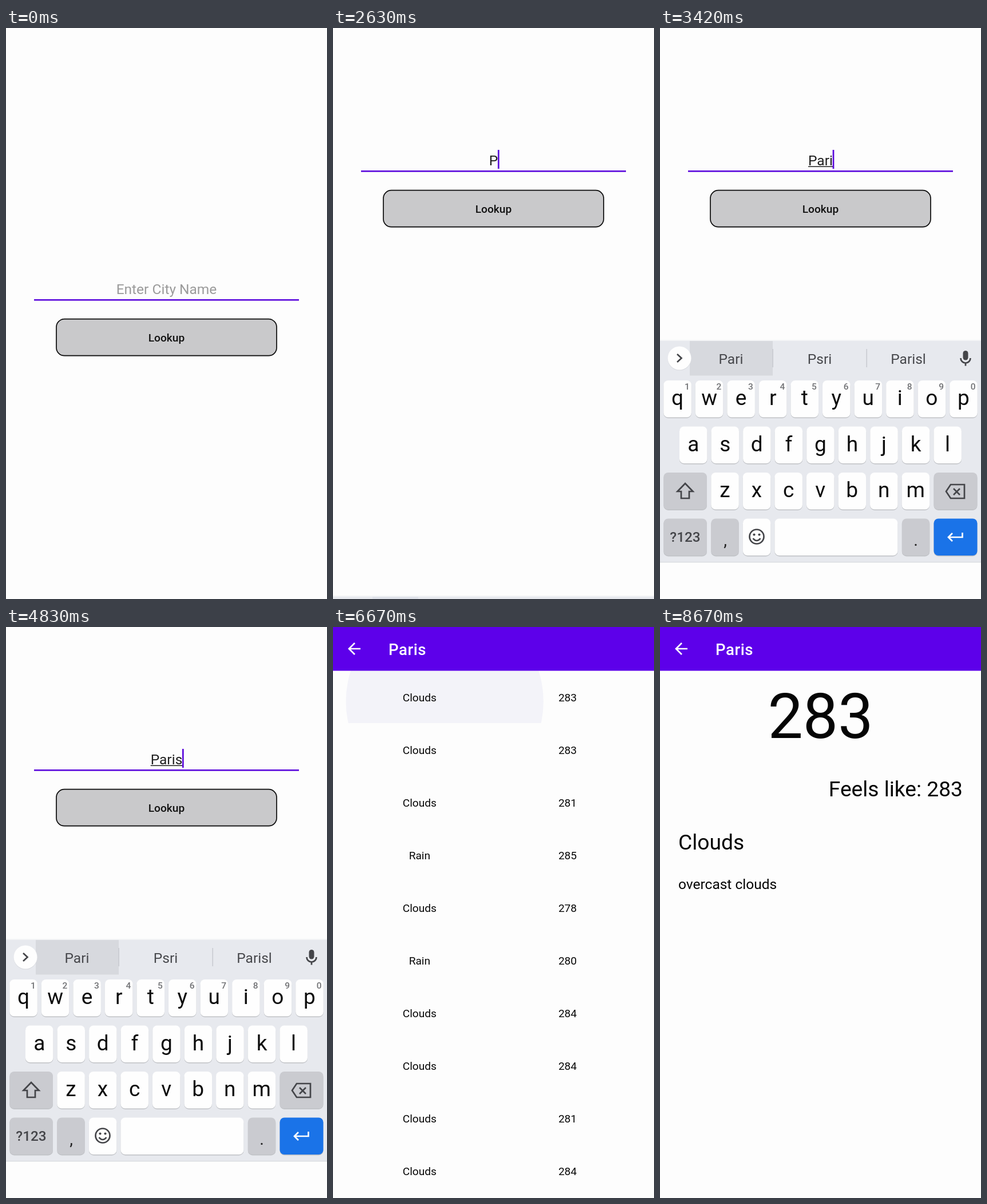
These frames come from a looping animation (561 by 998 pixels, 8.71 s). An HTML page:

```html
<!DOCTYPE html>
<html lang="en">
<head>
<meta charset="utf-8">
<title>City weather lookup</title>
<style>
  html, body { margin: 0; width: 100%; height: 100%; overflow: hidden; background: #fdfdfd; }
  svg { display: block; width: 100%; height: 100%; font-family: Roboto, "Noto Sans", sans-serif; }
  .mid { text-anchor: middle; }
  .icon { fill: none; stroke: #444549; stroke-width: 2.7; }
</style>
</head>
<body>
<svg id="stage" viewBox="0 0 561 998">
  <rect width="561" height="998" fill="#fdfdfd"/>

  <g id="form">
    <text id="hint" class="mid" x="280.5" y="465" font-size="24.5" fill="#9b9b9b">Enter City Name</text>
    <text id="typed" class="mid" x="280.5" y="465" font-size="24.5" fill="#202020"></text>
    <rect id="composing" y="466.5" height="1.5" fill="#202020"/>
    <rect id="caret" y="438" width="2.7" height="33" fill="#5a08dc"/>
    <rect x="49" y="474" width="463" height="2.6" fill="#5a08dc"/>
    <rect x="89" y="511" width="384" height="64" rx="15" fill="#eeeeef"/>
    <rect x="88" y="508.7" width="385" height="64" rx="14" fill="#c9c9cb" stroke="#0a0a0a" stroke-width="1.7"/>
    <text class="mid" x="280.5" y="548" font-size="19.1" font-weight="500" fill="#111">Lookup</text>
  </g>

  <g id="list"></g>

  <g id="detail" fill="#050505">
    <text class="mid" x="280.5" y="194" font-size="109.2">283</text>
    <text x="529" y="296" font-size="37.2" text-anchor="end">Feels like: 283</text>
    <text x="32" y="389" font-size="37.2">Clouds</text>
    <text x="32" y="457.5" font-size="24.5">overcast clouds</text>
  </g>

  <g id="spinner">
    <circle r="27" fill="#fdfdfd" stroke="#e2e1ee" stroke-width="1.6" vector-effect="non-scaling-stroke"/>
    <path id="arc" fill="none" stroke="#222" stroke-width="3.4"/>
  </g>

  <g id="header">
    <rect width="561" height="76.5" fill="#5d00ea"/>
    <path d="M48 38H28M38 28L28 38L38 48" fill="none" stroke="#fff" stroke-width="2.7"/>
    <text x="97" y="49" font-size="27.5" font-weight="500" letter-spacing=".55" fill="#fff">Paris</text>
  </g>

  <g id="keyboard"></g>
</svg>
<script>
const LOOP = 8710;
const TYPING = [[2630, 'P'], [2960, 'Pa'], [3120, 'Par'], [3380, 'Pari'], [3620, 'Paris']];
const TIMES = { keyboardIn: 2630, suggest: 2980, results: 5210, spinner: 5295, loaded: 5700, tap: 6440, detail: 6820 };
const ROWS = ['Clouds 283', 'Clouds 283', 'Clouds 281', 'Rain 285', 'Clouds 278',
  'Rain 280', 'Clouds 284', 'Clouds 284', 'Clouds 281', 'Clouds 284'];

const $ = id => document.getElementById(id);
const clamp = v => Math.max(0, Math.min(1, v));
const progress = (t, start, length) => clamp((t - start) / length);
const show = (id, on) => $(id).setAttribute('display', on ? 'inline' : 'none');
const set = (id, attrs) => { for (const k in attrs) $(id).setAttribute(k, attrs[k]); };
const label = (text, x, y, size, fill, extra = '') =>
  `<text class="mid" x="${x}" y="${y}" font-size="${size}" fill="${fill}" ${extra}>${text}</text>`;
const icon = (x, y, d, extra = '') =>
  `<path class="icon" transform="translate(${x} ${y})" d="${d}" ${extra}/>`;

function buildList() {
  const rows = ROWS.map((row, i) => {
    const [sky, temp] = row.split(' ');
    const y = 130 + 92 * i;
    return label(sky, 151.3, y, 19.1, '#080808') + label(temp, 410, y, 19.1, '#080808');
  });
  $('list').innerHTML = `<clipPath id="firstRow"><rect y="76" width="561" height="92"/></clipPath>
    <g clip-path="url(#firstRow)"><circle id="ripple" cy="130" fill="#f3f3f9"/></g>${rows.join('')}`;
}

function key(x, y, width, fill = '#fefefe') {
  return `<rect x="${x}" y="${y + 1.4}" width="${width}" height="64.5" rx="8" fill="#bfc1c5"/>
    <rect x="${x}" y="${y}" width="${width}" height="64.5" rx="8" fill="${fill}"/>`;
}

function letterRow(letters, left, top, digits = '') {
  return [...letters].map((letter, i) => {
    const x = left + 55.55 * i;
    return key(x, top, 48.5) + label(letter, x + 24.2, top + 43, 37, '#0c0c0c') +
      (digits ? label(digits[i], x + 41, top + 16, 15.5, '#707174', 'font-weight="500"') : '');
  }).join('');
}

function buildKeyboard() {
  const gray = '#cacbd0', ink = '#444549';
  const divider = x => `<rect x="${x}" y="561" width="1.4" height="32" fill="#c6c8ce"/>`;
  const tools =
    icon(109, 577, 'M3 3L11 11M4 -3A7 7 0 1 1 -10 -3A7 7 0 1 1 4 -3') +
    icon(190, 577.5, 'M-8 -10H8Q10 -10 10 -8V3L3 10H-8Q-10 10 -10 8V-8Q-10 -10 -8 -10M10 3H3V10M-5 0Q-2 6 4 1M-5 -4H-2M3 -4H6') +
    label('GIF', 270, 584, 18.5, ink, 'font-weight="900" letter-spacing="1"') +
    icon(352, 578, 'M-9.5 -10H9.5V11H-9.5ZM-4 -11H4V-7H-4ZM-5 -2H5M-5 2H5M-5 6H2') +
    divider(401) +
    [443.5, 452, 460.5].map(x => `<circle cx="${x}" cy="578" r="2.8" fill="${ink}"/>`).join('');
  const words = [['Pari', 124], ['Psri', 279], ['Parisl', 434]]
    .map(([word, x]) => label(word, x, 586.5, 24.5, '#47484c')).join('');

  $('keyboard').innerHTML = `
    <rect y="545" width="561" height="453" fill="#f3f4f6"/>
    <rect y="547" width="561" height="387" fill="#e7e9ee"/>
    <rect y="933" width="561" height="1.5" fill="#d9dbdf"/>
    <rect y="934.5" width="561" height="64" fill="#fdfdfd"/>
    <rect id="hover" y="547" height="60.5"/>
    <circle cx="34" cy="578" r="20.5" fill="#d6d8dd"/><circle cx="34" cy="577" r="20.5" fill="#fefefe"/>
    <path id="chevron" class="icon"/>
    <g id="tools">${tools}</g>
    <g id="words">${words}${divider(196.5)}${divider(360.5)}</g>
    <rect x="529.5" y="564" width="9" height="16.5" rx="4.5" fill="${ink}"/>
    ${icon(534, 577, 'M-8.5 0A8.5 8.5 0 0 0 8.5 0M0 8V13.5')}
    ${letterRow('qwertyuiop', 6.3, 616, '1234567890')}
    ${letterRow('asdfghjkl', 34, 696.5)}
    ${key(6.3, 777, 75.7, gray)}${letterRow('zxcvbnm', 89.3, 777)}${key(478.5, 777, 76, gray)}
    ${icon(44, 809, 'M0 -13L13.5 1H7V13H-7V1H-13.5Z')}
    ${icon(516, 810, 'M-8 -12H16V12H-8L-16 0ZM-3 -5L8 6M8 -5L-3 6')}
    ${key(6.3, 857.5, 75.7, gray)}${label('?123', 44, 898, 24.3, ink, 'font-weight="500"')}
    ${key(89.3, 857.5, 48.5, gray)}${label(',', 114, 905, 29, '#222')}
    ${key(144.9, 857.5, 48.5)}
    ${icon(169, 889, 'M12.5 0A12.5 12.5 0 1 1 -12.5 0A12.5 12.5 0 1 1 12.5 0M-6.5 3Q0 11 6.5 3')}
    <circle cx="164.5" cy="885.5" r="2.1" fill="${ink}"/><circle cx="173.5" cy="885.5" r="2.1" fill="${ink}"/>
    ${key(200.4, 857.5, 215)}
    ${key(422.8, 857.5, 48.5, gray)}${label('.', 447, 905, 29, '#222')}
    ${key(478.5, 857.5, 76, '#1a73e8')}
    ${icon(516, 890, 'M12.5 -8V0H-11M-5 -7L-12 0L-5 7', 'style="stroke:#fff"')}`;
}

function drawForm(t) {
  const entry = TYPING.filter(([start]) => t >= start).pop();
  const text = entry ? entry[1] : '';
  if ($('typed').textContent !== text) $('typed').textContent = text;
  const width = text ? $('typed').getComputedTextLength() : 0;
  show('hint', !text);
  show('caret', text);
  show('composing', text.length > 1);
  set('caret', { x: 280.2 + width / 2 });
  set('composing', { x: 280.5 - width / 2, width });
  set('form', { transform: `translate(0 ${text ? -225 : 0})` });
}

function drawKeyboard(t) {
  const enter = progress(t, TIMES.keyboardIn, 237);
  const leave = progress(t, TIMES.results, 200);
  const suggesting = t >= TIMES.suggest, leaving = leave > 0;
  show('keyboard', t >= TIMES.keyboardIn && leave < 1);
  set('keyboard', {
    transform: `translate(0 ${451 * (1 - enter) ** 2 + 247 * leave})`,
    opacity: 1 - leave
  });
  show('tools', !suggesting);
  show('words', suggesting && !leaving);
  set('chevron', { d: suggesting ? 'M30 570L37.5 577L30 584' : 'M38 570L30.5 577L38 584' });
  const [x, width, fill] = leaving ? [510, 50, '#dcdde2'] : suggesting ? [52, 145, '#d7d9de'] : [69, 80, '#dfe2e9'];
  set('hover', { x, width, fill });
}

function drawSpinner(t) {
  const scale = progress(t, TIMES.spinner, 158) * (1 - progress(t, TIMES.loaded, 150));
  show('spinner', scale > 0);
  const phase = (t - TIMES.spinner) / 1333;
  const sweep = 0.6 + 4 * Math.sin(Math.PI * (phase % 1)) ** 2;
  const start = phase * 2 * Math.PI;
  const point = a => `${10.2 * Math.cos(a)} ${10.2 * Math.sin(a)}`;
  set('arc', {
    d: `M${point(start)}A10.2 10.2 0 ${sweep > Math.PI ? 1 : 0} 1 ${point(start + sweep)}`,
    opacity: scale
  });
  set('spinner', { transform: `translate(280.5 137) scale(${scale})` });
}

function draw(t) {
  show('form', t < TIMES.results);
  show('header', t >= TIMES.results);
  show('list', t >= TIMES.loaded && t < TIMES.detail);
  show('detail', t >= TIMES.detail);
  drawForm(t);
  drawKeyboard(t);
  drawSpinner(t);
  const spread = progress(t, TIMES.tap, 380);
  set('ripple', { r: spread ? 284 * spread : 0, cx: 166 + 48 * spread });
}

buildList();
buildKeyboard();
const began = performance.now();
function tick() {
  draw((performance.now() - began) % LOOP);
  requestAnimationFrame(tick);
}
tick();
</script>
</body>
</html>
```
